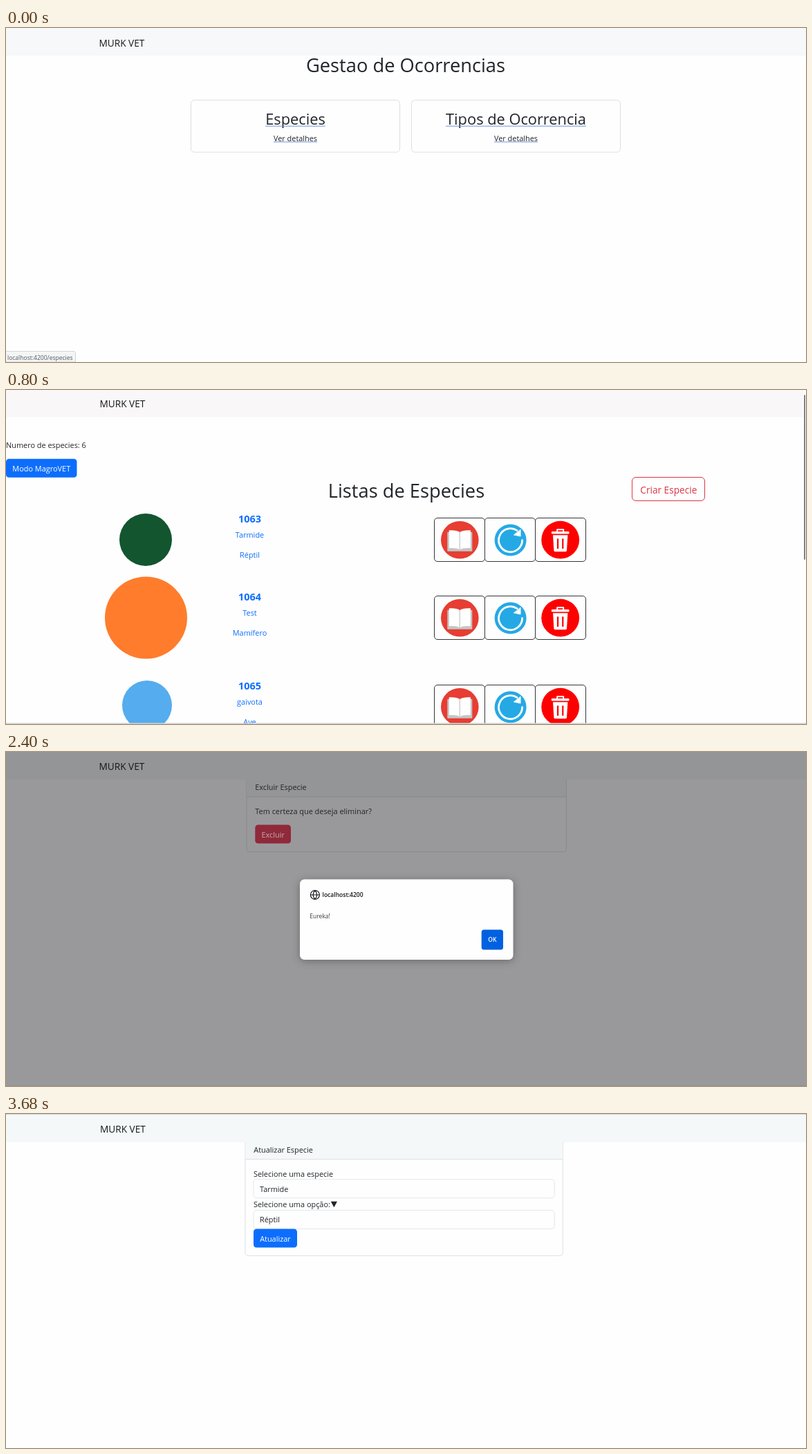
An HTML page that plays this animation: 1157 by 484 pixels, repeating every 4000 ms.

```html
<!DOCTYPE html>
<html lang="pt">
<head>
<meta charset="utf-8">
<title>Gestao de Ocorrencias</title>
<style>
html, body { margin: 0; width: 100%; height: 100%; overflow: hidden; background: #fefefe; }
svg { display: block; width: 1157px; height: 484px; font-family: "Open Sans", "Noto Sans", sans-serif; }
</style>
</head>
<body>
<svg id="stage" viewBox="0 0 1157 484"></svg>
<script>
const NS = 'http://www.w3.org/2000/svg';
const stage = document.getElementById('stage');
const INK = '#212529', BLUE = '#0d6efd', EDGE = '#dddfe1', PAPER = '#fefefe';
const BODY = 11.57, BRAND = 14.46, TITLE = 28.9, UI = 9.05;
const FONT_SCALE = 0.944;
const SCENE_MS = 800;
const APP = 'MURK VET', SPECIES = 'Tarmide';
let scene;

function el(tag, attrs, parent = scene) {
  const node = document.createElementNS(NS, tag);
  for (const key in attrs) node.setAttribute(key, attrs[key]);
  return parent.appendChild(node);
}

// Boxes are given by their edges.
function box(x1, y1, x2, y2, fill, rx = 0, stroke = 'none') {
  return el('rect', { x: x1, y: y1, width: x2 - x1, height: y2 - y1, rx, fill, stroke });
}

function line(x1, y1, x2, y2, stroke) {
  el('line', { x1, y1, x2, y2, stroke });
}

function dot(cx, cy, r, fill) {
  el('circle', { cx, cy, r, fill });
}

function path(d, fill, stroke = 'none', width = 1) {
  el('path', { d, fill, stroke, 'stroke-width': width, 'stroke-linejoin': 'round', 'stroke-linecap': 'round' });
}

function text(x, y, str, size = BODY, fill = INK, more = {}) {
  const node = el('text', { x, y, fill, 'font-size': (size * FONT_SCALE).toFixed(2), ...more });
  node.textContent = str;
  return node;
}

function centered(x, y, str, size, fill, more) {
  return text(x, y, str, size, fill, { 'text-anchor': 'middle', ...more });
}

function link(x, y, str, size, gap) {
  const half = centered(x, y, str, size).getComputedTextLength() / 2;
  line(x - half, y + gap, x + half, y + gap, '#6f94d8');
}

function button(x1, y1, x2, y2, fill, str, color = '#fff') {
  box(x1, y1, x2, y2, fill, 4.3);
  centered((x1 + x2) / 2, y1 + 18, str, BODY, color);
}

function header(height, fill, x, baseline, right = 1157) {
  box(0, 0, right, height, fill);
  text(x, baseline, APP, BRAND, '#16181b');
}

function card(x1, x2, top, split, bottom, fill, edge, title) {
  path(`M${x1} ${top}V${bottom - 5}q0 5 5 5H${x2 - 5}q5 0 5 -5V${top}`, 'none', edge);
  box(x1 + 0.5, top, x2 - 0.5, split, fill);
  line(x1, split, x2, split, edge);
  text(x1 + 12.3, split - 10, title);
}

function field(x1, y1, x2, str) {
  box(x1, y1, x2, y1 + 27, PAPER, 4.3, '#e4e7ea');
  text(x1 + 9, y1 + 18, str);
}

function bookIcon(x, y) {
  dot(x, y, 27.3, '#e73d32');
  box(x - 18, y - 11.5, x + 18, y + 16.5, '#c3c5c6', 1);
  for (const s of [-1, 1])
    path(`M${x + s * 0.6} ${y - 11.5}Q${x + s * 4} ${y - 14.5} ${x + s * 15.5} ${y - 14}V${y + 12}Q${x + s * 4} ${y + 11.5} ${x + s * 0.6} ${y + 14}Z`, '#fff');
}

function reloadIcon(x, y) {
  dot(x, y, 23, '#25a9e5');
  path(`M${x + 17} ${y}A17 17 0 1 1 ${x + 9.5} ${y - 14}`, 'none', '#fff', 2.8);
  path(`M${x + 14.5} ${y - 15}V${y - 5.5}L${x + 5} ${y - 7.5}Z`, '#fff', '#fff', 0.8);
}

function trashIcon(x, y) {
  dot(x, y, 27.4, '#fe0000');
  path(`M${x - 4.5} ${y - 12}V${y - 15}H${x + 4.5}V${y - 12}`, 'none', '#fff', 2);
  box(x - 12.8, y - 12.2, x + 12.8, y - 8.7, '#fff', 1);
  path(`M${x - 10.7} ${y - 7}H${x + 10.7}L${x + 9.3} ${y + 15.5}Q${x + 9} ${y + 17} ${x + 7.3} ${y + 17}H${x - 7.3}Q${x - 9} ${y + 17} ${x - 9.3} ${y + 15.5}Z`, '#fff');
  for (const s of [-1, 1]) box(x + s * 3.6 - 1.1, y - 2, x + s * 3.6 + 1.1, y + 13, '#fe0000', 1);
}

function home() {
  header(40, '#f6f8f9', 134.5, 26.5);
  centered(578, 63.5, 'Gestao de Ocorrencias', TITLE);
  [['Especies', 267.5], ['Tipos de Ocorrencia', 586.5]].forEach(([title, x]) => {
    box(x, 104.5, x + 302, 180, PAPER, 5, EDGE);
    link(x + 151, 140, title, 23.1, 2.2);
    link(x + 151, 163.5, 'Ver detalhes', BODY, 1.6);
  });
  path('M0 468.5H98q2.5 0 2.5 2.5V484H0Z', '#f4f5f6', '#d3d5d7');
  text(2, 480.5, 'localhost:4200/especies', UI, '#55585c');
}

function speciesRow(dy, id, name, kind) {
  centered(352.5, 191.5 + dy, id, 15.3, BLUE, { 'font-weight': 700 });
  centered(352.5, 213.7 + dy, name, BODY, BLUE);
  centered(352.5, 242.5 + dy, kind, BODY, BLUE);
  for (let i = 0; i < 3; i++)
    box(619.5 + 73 * i, 185.5 + dy, 692.5 + 73 * i, 248.5 + dy, PAPER, 4.5, '#33363a');
  bookIcon(656.3, 217.2 + dy);
  reloadIcon(729.6, 217.6 + dy);
  trashIcon(801.7, 217.2 + dy);
}

function list() {
  header(39, '#f9f7f8', 135.5, 25, 1153);
  text(0, 84, 'Numero de especies: 6');
  button(0, 99.8, 102.5, 126.8, BLUE, 'Modo MagroVET');
  centered(579, 156, 'Listas de Especies', TITLE);
  box(905.5, 126.5, 1010.5, 160.5, PAPER, 5.5, '#dc3545');
  centered(958.3, 150.3, 'Criar Especie', BRAND, '#dc3545');
  dot(202, 217, 38, '#12552f');
  dot(202.5, 330, 59.5, '#ff7c2c');
  dot(204, 457, 36, '#55acee');
  speciesRow(0, '1063', SPECIES, 'Réptil');
  speciesRow(113, '1064', 'Test', 'Mamífero');
  speciesRow(242, '1065', 'gaivota', 'Ave');
  box(1154, 7, 1156, 246, '#808184', 1);
  box(0, 482.5, 1157, 484, '#d2d3d4');
}

function details() {
  header(39, '#f4f7fa', 135.5, 25.5);
  card(348.5, 810, 39, 64, 349.5, '#f5f7f8', EDGE, 'Consultar detalhes');
  text(360.8, 89, 'ID da Especie:');
  field(361, 93.5, 797.5, '1063');
  box(775, 100, 788, 113.5, '#e9e9e9', 1);
  path('M779 105L781.5 102.7L784 105M779 108.7L781.5 111L784 108.7', 'none', '#747679');
  button(361, 120.5, 427.5, 147.5, BLUE, 'Pesquisar');
  line(361, 159.3, 797.5, 159.3, '#d0d2d4');
  [['ID da Especie:', '1063'], ['Especie:', 'Réptil'], ['Classe Animal:', SPECIES]].forEach(([label, value], i) => {
    text(360.8, 185.3 + 46.2 * i, label);
    text(360.8, 202.6 + 46.2 * i, value);
  });
  button(361, 310.5, 409.3, 337.8, '#6c757d', 'Voltar');
}

function remove() {
  box(0, 0, 1157, 484, '#99999b');
  header(40, '#949597', 134.5, 26);
  card(348, 810.5, 40, 65, 144.7, '#949597', '#87888a', 'Excluir Especie');
  text(360.3, 90, 'Tem certeza que deseja eliminar?');
  button(360.3, 105.5, 412, 132.6, '#90293a', 'Excluir', '#bdaeb2');
  box(425, 184.5, 733.5, 301, PAPER, 6.5).style.filter = 'drop-shadow(0 2px 6px rgba(20,20,30,.35))';
  path('M440.4 207a6.5 6.5 0 1 0 13 0a6.5 6.5 0 1 0 -13 0M440.4 207H453.4M446.9 200.5q-5.6 6.5 0 13q5.6 -6.5 0 -13', 'none', '#15141a', 1.2);
  text(457.5, 209.7, 'localhost:4200', UI, '#15141a', { 'font-weight': 600 });
  text(439.3, 240.5, 'Eureka!', UI, '#3a3944');
  box(687.7, 257.5, 719, 286.5, '#0061e0', 3.5);
  centered(703.4, 275.4, 'OK', UI, '#fff', { 'font-weight': 600 });
  box(0, 483, 1157, 484, '#8f9092');
}

function update() {
  header(41, '#f5f8f9', 136, 27);
  box(0, 0, 1157, 1, '#cdd4d5');
  card(346, 805.3, 41, 65.7, 205.3, '#f5f8f9', EDGE, 'Atualizar Especie');
  text(358, 90.5, 'Selecione uma especie');
  field(358, 94.7, 793.3, SPECIES);
  text(358, 135, 'Selecione uma opção:');
  path('M469.8 126.8H479L474.4 135.2Z', INK);
  field(358, 139.4, 793.3, 'Réptil');
  button(358, 166.5, 421, 193.5, BLUE, 'Atualizar');
}

const scenes = [home, list, details, remove, update].map(build => {
  scene = el('g', {}, stage);
  build();
  return scene;
});

function draw(ms) {
  const current = Math.floor(ms / SCENE_MS) % scenes.length;
  scenes.forEach((g, i) => g.setAttribute('display', i === current ? 'inline' : 'none'));
}

const start = performance.now();
function tick() {
  draw(performance.now() - start);
  requestAnimationFrame(tick);
}
tick();
</script>
</body>
</html>
```
